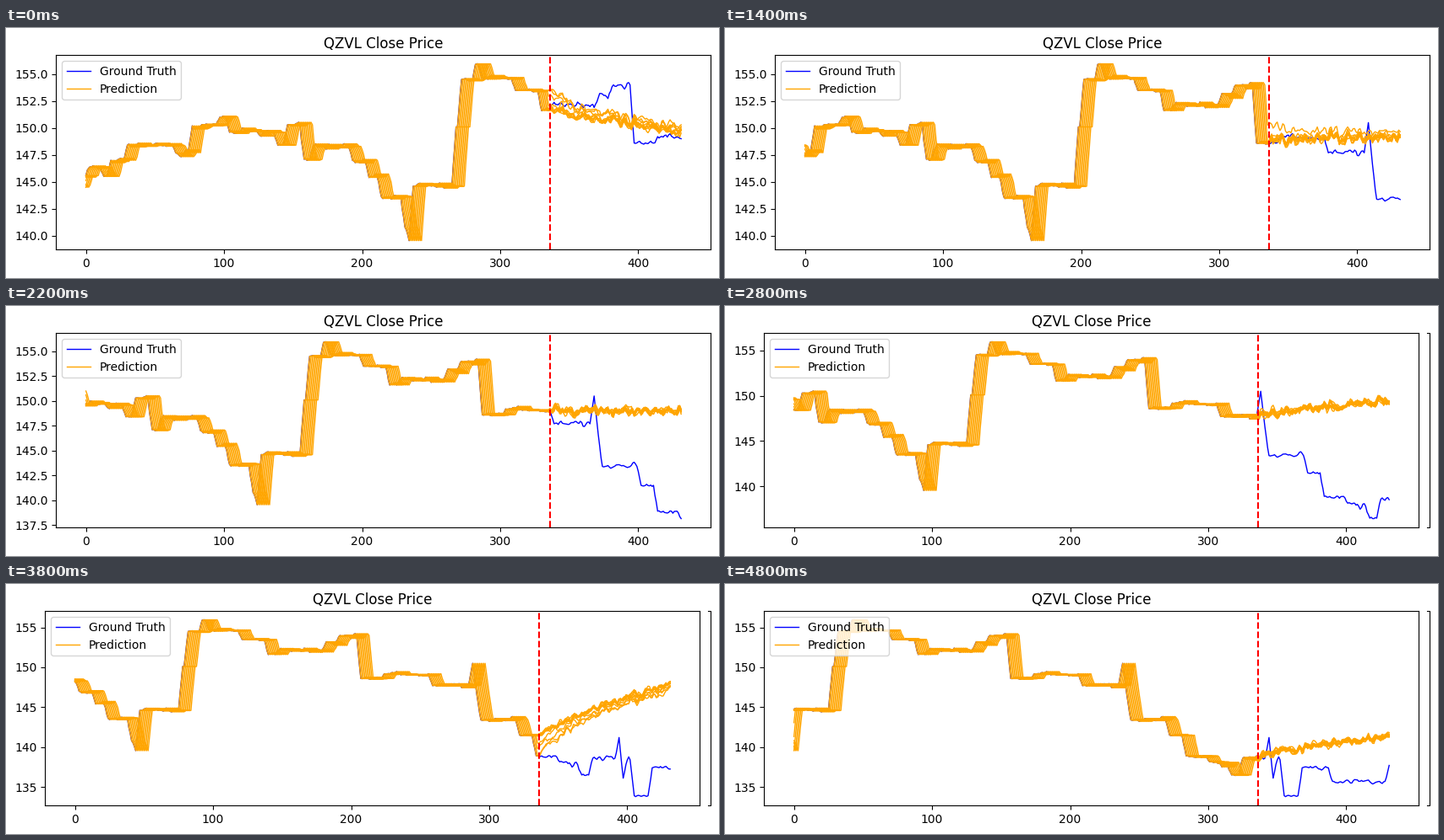
A matplotlib script that plays this animation: 844x297 px, repeating every 5 s.

```python
import matplotlib.pyplot as plt
import numpy as np
from matplotlib.animation import FuncAnimation
from matplotlib.lines import Line2D
from matplotlib.ticker import MultipleLocator

W, H, DPI = 844, 297, 100
TOP, BOTTOM, AXES_WIDTH = 32.1, 263.1, 775
FRAMES, INTERVAL = 25, 200
STEP = 10          # samples the window advances per frame
LAGS = 10          # overlaid predictions per frame
SPLIT, LENGTH = 336, 432
WIDE_LABELS_UNTIL = 12

# The price holds a level, then ramps to the next: (start of ramp, new level)
FIRST, LAST, START_LEVEL, RAMP = -9, 671, 144.5, 3
LEVELS = [
    (-7, 145.6), (0, 146.4), (10, 145.5), (15, 147.0), (27, 148.4), (62, 147.7),
    (74, 150.2), (94, 151.0), (101, 149.6), (136, 148.4), (143, 150.3),
    (155, 147.1), (162, 148.3), (190, 147.0), (202, 145.4), (211, 143.6),
    (228, 140.8), (231, 139.55), (234, 144.6), (265, 150.1), (269, 154.5),
    (280, 155.95), (284, 154.7), (308, 153.5), (327, 151.6), (335, 152.2),
    (369, 153.2), (379, 154.0), (394, 148.6), (411, 149.2), (446, 147.7),
    (475, 150.5), (478, 146.6), (481, 143.4), (509, 141.5), (521, 138.9),
    (538, 138.15), (546, 137.8), (554, 136.5), (562, 138.6), (581, 141.2),
    (584, 136.1), (587, 138.4), (592, 133.9), (605, 137.4), (627, 135.7),
    (668, 137.7),
]

# Change of the forecast over its horizon: (frame, rise)
RISES = [(0, -2.4), (3, -2.4), (7, 0.4), (11, -0.1), (14, 1.6), (19, 7.0), (24, 2.7)]


def noise(seed, size, scale):
    """Seeded jitter, slightly smoothed."""
    white = np.random.default_rng(seed).normal(0, scale, size + 2)
    return np.convolve(white, [0.3, 0.7, 0.3], "valid")


def make_price():
    knots, level = [(FIRST, START_LEVEL)], START_LEVEL
    for start, new_level in LEVELS:
        knots += [(start, level), (start + RAMP, new_level)]
        level = new_level
    x, y = np.array(knots).T
    samples = np.arange(FIRST, LAST + 1)
    jitter = noise(4, samples.size, 0.17)
    jitter[np.isin(samples, x)] = 0
    return np.interp(samples, x, y) + jitter


PRICE = make_price()
X = np.arange(LENGTH)
HORIZON = np.arange(LENGTH - SPLIT)


def window(start, length):
    return PRICE[start - FIRST:start - FIRST + length]


def mean_forecast(frame):
    last_prices = window(frame * STEP + SPLIT - LAGS, LAGS)
    rise = np.interp(frame, *np.array(RISES).T)
    ease = (HORIZON / HORIZON[-1]) ** 0.7
    return last_prices.mean() + rise * ease + noise(100 + frame, HORIZON.size, 0.22)


def prediction(frame, lag, forecast):
    start = frame * STEP - lag
    history = window(start, SPLIT)
    pull = 0.3 + 0.7 * np.exp(-HORIZON / 16)
    offset = (history[-1] - forecast[0]) * pull
    future = forecast + offset + noise(1000 + start, HORIZON.size, 0.2)
    return np.concatenate([history, future])


fig = plt.figure(figsize=(W / DPI, H / DPI), dpi=DPI, facecolor="white")
ax = fig.add_axes([0, 0, 1, 1])

# Sliver of the wider axes frame that stays at the right edge
edge_x = np.array([831, 834.3, 834.3, 831]) / W
edge_y = 1 - np.array([TOP, TOP, BOTTOM, BOTTOM]) / H
edge = fig.add_artist(Line2D(edge_x, edge_y, color="black", lw=0.8, snap=True))


def draw(frame):
    wide = frame < WIDE_LABELS_UNTIL
    left = 59.4 if wide else 46.4
    ax.clear()
    ax.set_position([left / W, 1 - BOTTOM / H, AXES_WIDTH / W, (BOTTOM - TOP) / H])
    ax.yaxis.set_major_locator(MultipleLocator(2.5 if wide else 5))
    edge.set_visible(not wide)

    ax.plot(X, window(frame * STEP, LENGTH), color="blue", lw=1, label="Ground Truth")
    forecast = mean_forecast(frame)
    for lag in range(LAGS):
        ax.plot(X, prediction(frame, lag, forecast), color="orange", lw=1,
                label="Prediction" if lag == 0 else None)
    ax.axvline(SPLIT, color="red", ls="--")
    ax.set_title("QZVL Close Price")
    ax.legend(loc="upper left")
    return ax, edge


anim = FuncAnimation(fig, draw, frames=FRAMES, interval=INTERVAL,
                     repeat=True, repeat_delay=0, blit=False)
plt.show()
```
